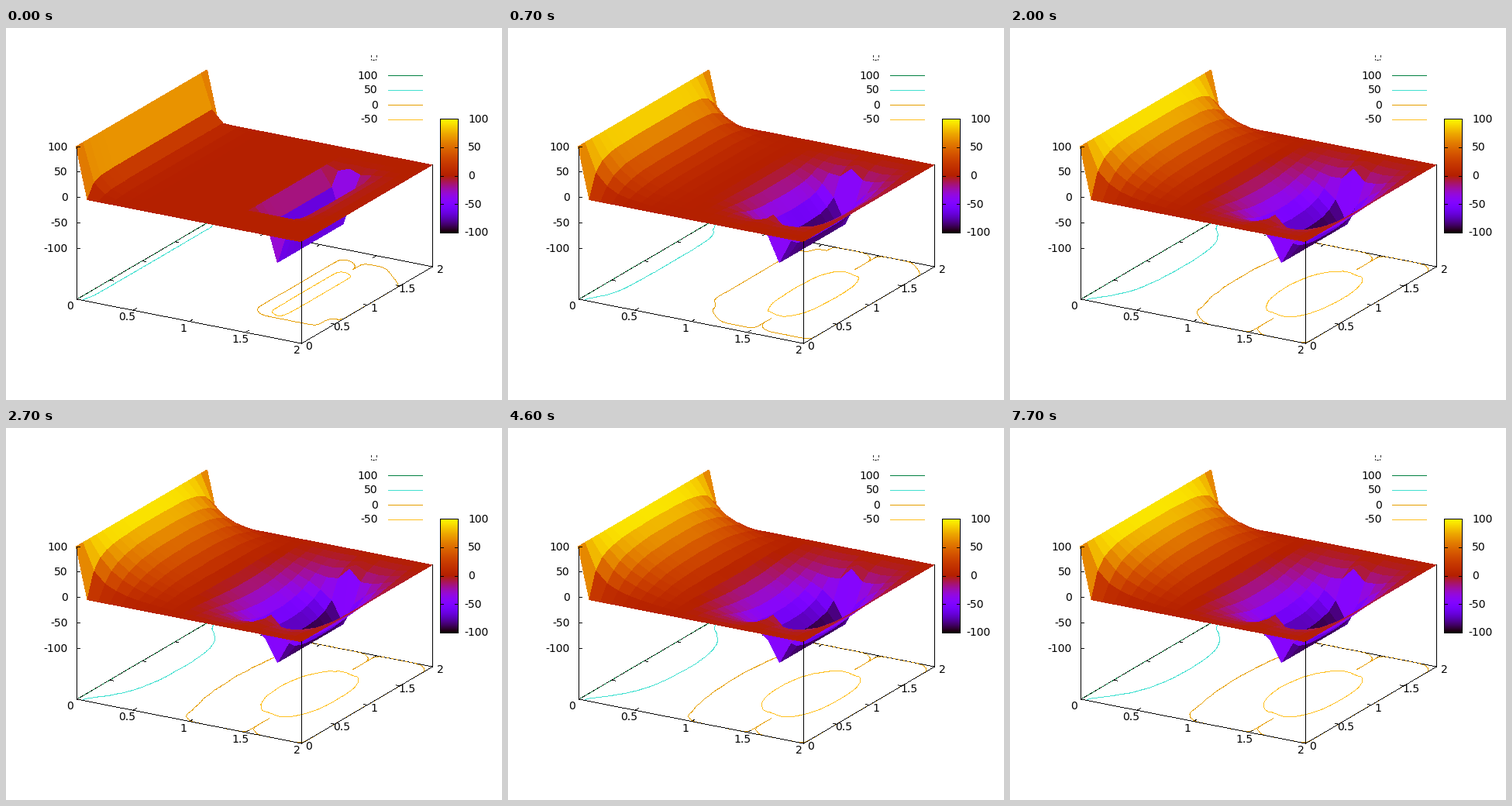
These frames come from a looping animation (640x480 px, 8 s). A matplotlib script:

```python
import numpy as np
import matplotlib.pyplot as plt
from matplotlib.animation import FuncAnimation
from matplotlib.collections import PolyCollection

W, H, DPI = 640, 480, 100
N, STEP = 21, 0.1
FRAMES, INTERVAL = 80, 100
PLATE = 15
LEVELS = {100: "#008040", 50: "#40e0d0", 0: "#e69f00", -50: "#ffc020"}


def project(x, y, z=-200):
    """Screen position of a point in the box."""
    return np.stack([90 + 145 * x + 84.5 * y + 0 * z,
                     349.5 + 28.5 * x - 49.5 * y - 0.6565 * (z + 200)], axis=-1)


def palette(value):
    g = np.clip((np.asarray(value, float) + 100) / 200, 0, 1)
    return np.stack([np.sqrt(g), g ** 3,
                     np.clip(np.sin(2 * np.pi * g), 0, 1)], axis=-1)


def relax(v):
    """One in-place sweep over the free points."""
    for i in range(1, N - 1):
        if i == PLATE:
            continue
        for j in range(1, N - 1):
            v[i][j] = (v[i - 1][j] + v[i + 1][j]
                       + v[i][j - 1] + v[i][j + 1]) / 4


def solve():
    v = [[0.0] * N for _ in range(N)]
    v[0] = [100.0] * N
    v[PLATE][5:16] = [-100.0] * 11
    states = []
    for _ in range(FRAMES):
        relax(v)
        states.append(np.trunc(np.array(v)))
    return states


STATES = solve()
GX, GY = np.meshgrid(np.arange(N) * STEP, np.arange(N) * STEP, indexing="ij")
FLOOR = project(GX, GY).reshape(-1, 2)

# Cells run from the far corner to the near one.
CELLS = np.array([[i * N + j, (i + 1) * N + j, (i + 1) * N + j + 1, i * N + j + 1]
                  for j in range(N - 2, -1, -1) for i in range(N - 1)])
TRIANGLES = np.concatenate([CELLS[:, [0, 1, 3]], CELLS[:, [1, 2, 3]]])


def bspline(points, closed):
    """Uniform cubic B-spline with the points as its control polygon."""
    p = np.array(points)
    if closed:
        p = np.concatenate([p[-1:], p, p[:2]])
    else:
        p = np.concatenate([p[:1], p[:1], p, p[-1:], p[-1:]])
    t = np.linspace(0, 1, 6)[:, None, None]
    curve = ((1 - t) ** 3 * p[:-3] + (3 * t ** 3 - 6 * t ** 2 + 4) * p[1:-2]
             + (-3 * t ** 3 + 3 * t ** 2 + 3 * t + 1) * p[2:-1]
             + t ** 3 * p[3:]) / 6
    return curve.swapaxes(0, 1).reshape(-1, 2)


def pixels(path):
    """Whole pixels along a polyline."""
    parts = []
    for p, q in zip(path[:-1], path[1:]):
        n = int(np.ceil(np.abs(np.subtract(q, p)).max())) + 1
        parts.append(np.linspace(p, q, n))
    return np.floor(np.concatenate(parts) + 0.5)


def contour(z, level):
    """Pixels of all smoothed contour paths of one level."""
    above = z >= level
    count = above[TRIANGLES].sum(axis=1)
    links, crossing = {}, {}
    for tri in TRIANGLES[(count == 1) | (count == 2)]:
        ends = []
        for a, b in zip(tri, np.roll(tri, -1)):
            if above[a] != above[b]:
                edge = (min(a, b), max(a, b))
                t = (level - z[a]) / (z[b] - z[a])
                crossing[edge] = FLOOR[a] + t * (FLOOR[b] - FLOOR[a])
                ends.append(edge)
        for edge, other in (ends, ends[::-1]):
            links.setdefault(edge, []).append(other)

    found, used = [], set()
    for start in sorted(links, key=lambda e: len(links[e])):
        if start in used:
            continue
        closed = len(links[start]) == 2
        path, edge = [], start
        while edge is not None:
            used.add(edge)
            point = crossing[edge]
            if not path or np.abs(point - path[-1]).max() > 1e-6:
                path.append(point)
            edge = next((e for e in links[edge] if e not in used), None)
        if len(path) > 2:
            curve = bspline(path, closed)
            found.append(pixels(curve))
    return np.concatenate(found) if found else np.empty((0, 2))


fig = plt.figure(figsize=(W / DPI, H / DPI), dpi=DPI, facecolor="white")
ax = fig.add_axes([0, 0, 1, 1])
ax.axis("off")


def dots(xy, color, z):
    return ax.plot(xy[:, 0], xy[:, 1], ",", color=color, zorder=z)[0]


def line(p, q, color="black", z=1, dashed=False):
    xy = pixels([p, q])
    if dashed:
        xy = xy[np.arange(len(xy)) % 6 < 3]
    dots(xy, color, z)


def label(x, y, text, ha="center"):
    ax.text(x, y, text, ha=ha, va="center_baseline", fontsize=14 * 72 / DPI,
            family="DejaVu Sans", zorder=9)


def draw_box():
    near_left, near, right, far = [project(x, y) for x, y in
                                   ((0, 0), (2, 0), (2, 2), (0, 2))]
    for p, q in ((near_left, far), (far, right)):
        line(p, q)
        line(p, q, z=3, dashed=True)
    for p, q in ((near_left, near), (near, right),
                 (near_left, project(0, 0, 100)),
                 (near, project(2, 0, 0)), (right, project(2, 2, 0))):
        line(p, q, z=6)

    for k in range(5):
        s = k / 2
        if 0 < k < 4:
            line(project(s, 0), project(s, 0.05), z=6)
            line(project(s, 2), project(s, 1.95))
            line(project(0, s), project(0.03, s))
            line(project(2, s), project(1.97, s), z=6)
        label(82 + 73.2 * k, 357 + 14.3 * k, f"{s:g}")
        label(390 + 42.4 * k, 409 - 24.7 * k, f"{s:g}")
        value = 100 - 50 * k
        x, y = project(0, 0, value)
        line((x, y), (x + 4, y), z=6)
        label(79, y - 1, f"{value}", "right")


def draw_key():
    for k, (level, color) in enumerate(LEVELS.items()):
        y = 61 + 19 * k
        label(479, y - 1.5, f"{level}", "right")
        line((492, y), (536, y), color)
    # Clipped remains of the key title.
    for x, y, dx, dy in ((470, 35, 0, 2), (477, 35, 0, 2),
                         (470, 40, 0, 1), (476, 40, 0, 1), (472, 41, 2, 0)):
        line((x, y), (x + dx, y + dy), "#333333")


def draw_colorbox():
    left, right, top, bottom = 559, 582, 117, 264
    ramp = palette(np.linspace(100, -100, bottom - top))[:, None, :]
    ax.imshow(ramp, extent=(left, right, bottom, top), aspect="auto",
              interpolation="nearest", zorder=1)
    corners = [(left, top), (right, top), (right, bottom), (left, bottom)]
    for p, q in zip(corners, corners[1:] + corners[:1]):
        line(p, q, z=2)
    for k in range(5):
        y = top + (bottom - top) * k / 4
        line((left, y), (left + 4, y), z=2)
        line((right - 4, y), (right, y), z=2)
        value = 100 - 50 * k
        label(595.5 if value >= 0 else 590.5, y - 1.5, f"{value}", "left")


draw_box()
draw_key()
draw_colorbox()
ax.set_aspect("auto")
ax.set_xlim(-0.5, W - 0.5)
ax.set_ylim(H - 0.5, -0.5)

curves = {level: dots(np.empty((0, 2)), color, 2)
          for level, color in LEVELS.items()}
surface = ax.add_collection(PolyCollection(
    [], edgecolors="none", antialiaseds=False, zorder=5))


def update(frame):
    z = STATES[frame]
    points = project(GX, GY, z).reshape(-1, 2)
    z = z.ravel()
    surface.set_verts(points[CELLS])
    surface.set_facecolor(palette(z[CELLS].mean(axis=1)))
    for level, curve in curves.items():
        curve.set_data(*contour(z, level).T)
    return [surface, *curves.values()]


anim = FuncAnimation(fig, update, frames=FRAMES, interval=INTERVAL,
                     repeat=True, repeat_delay=0, blit=False)
plt.show()
```
